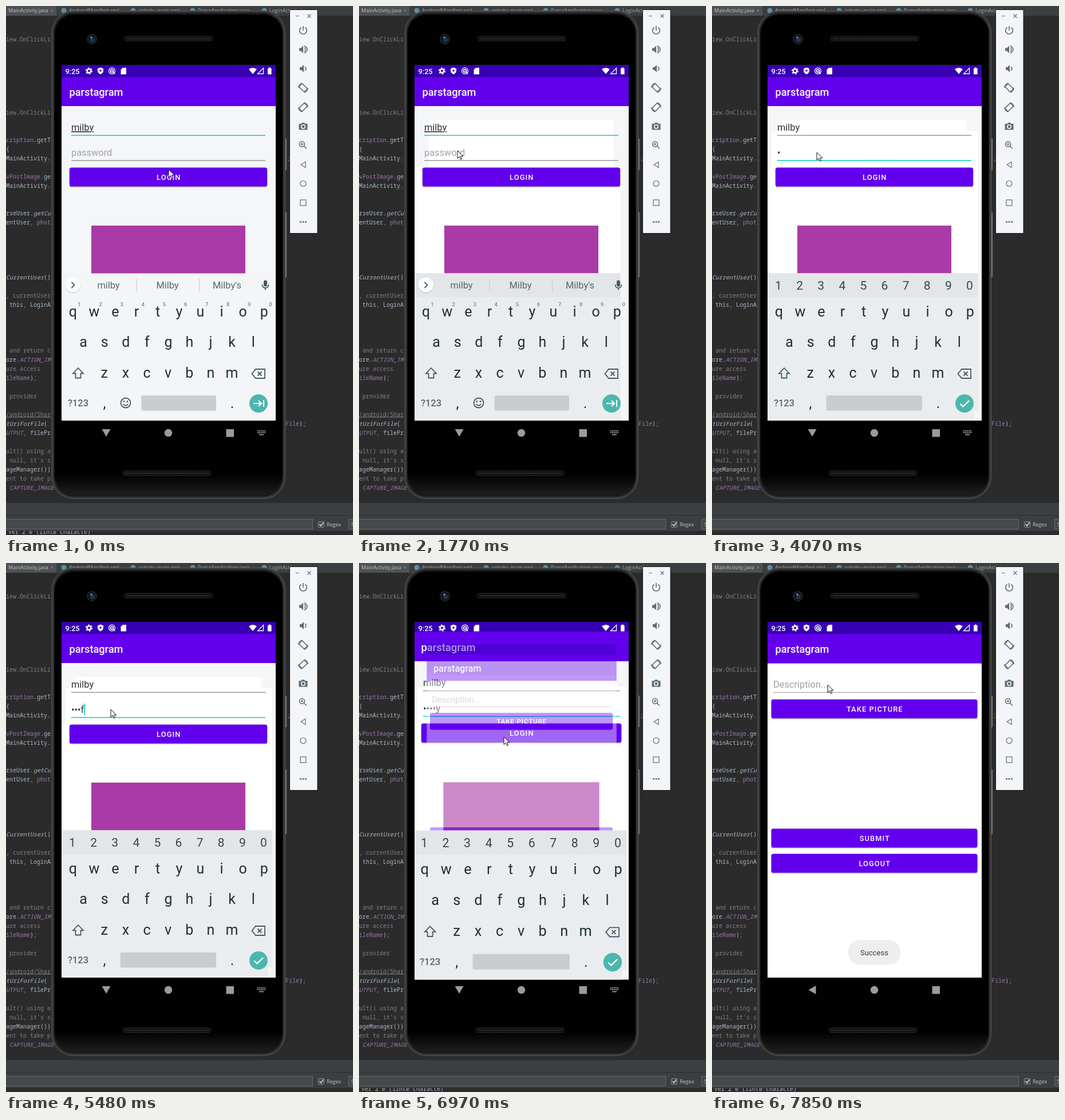
Recreate the animation shown at these times as an HTML page. Size 606 px wide and 925 px high, loop 8 s.

```html
<!DOCTYPE html>
<html lang="en">
<head>
<meta charset="utf-8">
<title>Login demo</title>
<style>
html, body { margin: 0; width: 100%; height: 100%; overflow: hidden; background: #2b2b2b; }
svg { display: block; width: 100vw; height: 100vh; font-family: Roboto, sans-serif; }
.code { font: 10px "Noto Sans Mono", monospace; fill: #a9b7c6; white-space: pre; }
.code .c { fill: #808080; }
.code .p { fill: #9876aa; }
.code .o { fill: #cc7832; }
.code .i { font-style: italic; }
.code .u { text-decoration: underline; }
.ide { font: 9px "Open Sans", sans-serif; fill: #c3c5c7; }
.title { font-size: 18.2px; font-weight: 500; fill: #fff; }
.field { font-size: 16.4px; fill: #303033; }
.hint { font-size: 16.4px; fill: #a0a0a3; }
.button { font-size: 12.75px; font-weight: 500; letter-spacing: 1.14px; fill: #fff; text-anchor: middle; }
.key { font-size: 25px; fill: #1f2f36; text-anchor: middle; }
.digit { font-size: 21px; fill: #37444b; text-anchor: middle; }
.small { font-size: 9.5px; font-weight: 500; fill: #7b868b; text-anchor: middle; }
.word { font-size: 16.4px; fill: #5a656b; text-anchor: middle; }
.line { fill: none; stroke: #455a64; stroke-width: 1.8; }
.tool { fill: none; stroke: #5d6d77; stroke-width: 1.6; }
.tool .full { fill: #5d6d77; stroke: none; }
</style>
</head>
<body>
<svg id="stage" viewBox="0 0 606 925" preserveAspectRatio="none"></svg>
<script>
const stage = document.getElementById('stage');
const rect = (x, y, w, h, fill, rest = '') =>
  `<rect x="${x}" y="${y}" width="${w}" height="${h}" fill="${fill}" ${rest}/>`;
const text = (x, y, cls, s, rest = '') => `<text x="${x}" y="${y}" class="${cls}" ${rest}>${s}</text>`;
const path = (d, rest = '') => `<path d="${d}" ${rest}/>`;
const circle = (x, y, r, rest = '') => `<circle cx="${x}" cy="${y}" r="${r}" ${rest}/>`;
const group = (id, body, rest = '') => `<g id="${id}" ${rest}>${body}</g>`;
const button = (x, y, w, label) =>
  rect(x, y + 1, w, 33.5, '#0004', 'rx="3.6"') + rect(x, y, w, 33, '#6200ee', 'rx="3.6"') +
  text(284.3, y + 21.3, 'button', label);
const row = (chars, x, step, y, cls) =>
  [...chars].map((ch, i) => text(x + step * i, y, cls, ch)).join('');
const header = rect(97, 103, 374, 22, '#3700b3') + rect(97, 124, 374, 51.5, '#6200ee') +
  text(110.5, 157, 'title', 'parstagram');

// Code lines: [y, markup]; "~cp:word~" marks a styled run.
const codeLines = [
  [58, '~c:iew.OnClickLi~'], [186, '~c:iew.OnClickLi~'], [234, '~p:cription~.getT'], [250, '{'],
  [266, 'MainActivity.'], [298, '~p:vPostImage~.ge'], [314, 'MainActivity.'],
  [362, 'rseUser.~i:getCu~'], [378, 'entUser~o:,~ ~p:phot~'], [474, '~i:CurrentUser~()'],
  [506, '~c:, currentUser~'], [522, ' this~o:,~ LoginA'], [602, '~c: and return c~'],
  [618, 'ore.~pi:ACTION_IM~'], [634, '~c:ure access~'], [650, '~p:ileName~)~o:;~'],
  [682, '~c: provider~'], [714, '~cu:/android/Shar~'], [730, '~i:tUriForFile~( '],
  [746, '~pi:UTPUT~~o:,~ filePr'], [778, '~c:ult() using a~'], [794, "~c: null, it's s~"],
  [810, 'ageManager())'], [826, '~c:ent to take p~'], [842, ' ~pi:CAPTURE_IMAGE~']
];
const styled = s => s.replace(/~(\w+):([^~]*)~/g,
  (_, cls, run) => `<tspan class="${[...cls].join(' ')}">${run}</tspan>`);
const code = (x, y, s) => text(x, y + 3.5, 'code', styled(s));

const editor = rect(0, 0, 606, 925, '#2b2b2b') +
  rect(0, 0, 606, 17, '#3c3f41') + rect(0, 0, 88, 17, '#4e5254') +
  text(4, 11, 'ide', 'MainActivity.java') + text(78, 11, 'ide', '×', 'opacity=".6"') +
  [[101, 'AndroidManifest.xml'], [222, 'activity_main.xml'], [326, 'ParseApplication.java'], [451, 'LoginActivity.java']]
    .map(([x, s]) => circle(x, 8, 4.5, 'fill="#5d8fa0"') + text(x + 9, 11, 'ide', s, 'opacity=".8"')).join('') +
  codeLines.map(([y, s]) => code(0, y, s)).join('') +
  code(488, 730, '~p:File~)~o:;~') + code(491, 266, '~o:;~') +
  rect(0, 869, 606, 49, '#3c3f41') + rect(0, 890, 606, 1.5, '#303234') +
  rect(-2, 897.5, 537.5, 17, '#45494a', 'stroke="#656869"') +
  rect(545.5, 901.5, 10, 10, '#43494a', 'stroke="#8a8c8d" rx="1"') +
  path('M547.5 906l2.5 3 4.5-6', 'fill="none" stroke="#ddd" stroke-width="1.4"') +
  text(560, 910, 'ide', 'Regex') + rect(598.5, 897.5, 20, 17, '#45494a', 'stroke="#656869"') +
  text(603, 910, 'ide', 'S') +
  group('log', text(4, 923, 'code', 'ver 2 0 (lint0 characte)'), 'clip-path="url(#logClip)"');

const speaker = (x, y) => rect(x, y, 154, 8, '#0b0b0b', 'rx="4" stroke="#2e2e2e"') +
  path(`M${x + 4} ${y + 4}h146`, 'stroke="#303030" stroke-width="3" stroke-dasharray="2 1"');
const phone = [[231, 57], [360, 115]].map(([y, h]) => rect(485, y, 6, h, '#686868', 'rx="2" stroke="#202020"')).join('') +
  rect(80, 8.5, 407.5, 853, '#303030', 'rx="38" stroke="#5c5c5c"') +
  rect(82.5, 11, 402.5, 848, '#1b1b1b', 'rx="36" stroke="#484848"') +
  rect(85, 15, 398, 838, 'url(#glass)', 'rx="33"') +
  circle(150, 58, 8.5, 'fill="#15181c" stroke="#2b2b2b"') + circle(151, 59, 4, 'fill="#20354f"') +
  circle(149, 55, 1.5, 'fill="#8ba6be"') + speaker(207, 53) + speaker(204, 813);

const rotateIcon = (y, flip) => `<g transform="translate(519 ${y}) scale(${flip} 1)">` +
  rect(-4, -6.5, 8, 13, 'none', 'transform="rotate(-45)"') + path('M-8 0a8 8 0 0 1 6-8M8 0a8 8 0 0 1-6 8') + '</g>';
const toolbar = rect(495.5, 6.5, 48.5, 391, '#f3f5f8', 'stroke="#17191a"') + '<g class="tool">' +
  path('M506 17.5h6M526.5 14.5l6 6m0-6l-6 6', 'stroke-width="1.1"') +
  path('M515.5 37.5a6.3 6.3 0 1 0 7 0M519 35v8') +
  path('M512 73.5h3l4-4v13l-4-4h-3z', 'class="full"') + path('M521 72.5q4 3.5 0 7M521 69.5q10 6.5 0 13') +
  path('M513 107h3l4-4v13l-4-4h-3z', 'class="full"') + path('M522 106q4 3.5 0 7') +
  rotateIcon(143, 1) + rotateIcon(177, -1) +
  path('M511.5 206h4l1.5-2h4l1.5 2h4v10.5h-15z', 'class="full"') +
  circle(519, 211, 3.2, 'stroke="#f3f5f8"') +
  circle(517, 241.5, 4.5) + path('M520.5 245l4.5 4.5M515 241.5h4m-2-2v4') +
  path('M523 272.5v10l-8-5z', 'stroke-width="1.2"') + circle(519, 310.5, 5, 'stroke-width="1.2"') +
  rect(514, 339, 10, 10, 'none', 'stroke-width="1.2"') +
  [514.5, 519, 523.5].map(x => circle(x, 377.5, 1.6, 'class="full"')).join('') + '</g>';

const login = header + rect(97, 175, 374, 550, '#f4f6f8') +
  group('patch', rect(122, 199, 323, 84, '#fff') + rect(97, 282, 360, 186, '#fff')) +
  group('widePatch', rect(104, 219, 361, 249, '#fff')) +
  text(114, 218, 'field', 'milby', 'id="user"') + rect(114, 225.5, 339, 1.5, '#999', 'id="userLine"') +
  text(114, 262, 'hint', 'password', 'id="pass"') + rect(114, 269.5, 339, 1.5, '#999', 'id="passLine"') +
  rect(0, 0, 1.6, 20, '#03cbb8', 'id="caret"') +
  button(110.8, 282.5, 345.4, 'LOGIN') +
  circle(258, 299, 0, 'id="ripple" fill="#fff" clip-path="url(#loginClip)"') +
  rect(149, 384, 269, 269, '#a93aa6');

const suggestions = circle(117, 488.5, 13.5, 'fill="#0003"') + circle(117, 487.7, 13.3, 'fill="#fbfcfd"') +
  path('M114.5 483l5 5-5 5', 'class="line"') +
  [[179, 'milby'], [282, 'Milby'], [386, "Milby's"]].map(([x, s]) => text(x, 494, 'word', s)).join('') +
  rect(227.5, 477, 1, 22, '#c3c8cb') + rect(337, 477, 1, 22, '#c3c8cb') +
  rect(450, 479.5, 6, 11, '#455a64', 'rx="3"') +
  path('M447.5 487c0 8 11 8 11 0M453 493v3.5', 'class="line" stroke-width="1.4"') +
  row('1234567890', 128, 37.1, 525, 'small') +
  circle(209, 694, 8.5, 'class="line"') + path('M204.5 696q4.5 5 9 0', 'class="line"') +
  circle(206, 691.5, 1.4, 'fill="#455a64"') + circle(212, 691.5, 1.4, 'fill="#455a64"');
const keyboard = rect(97, 467.5, 374, 257.5, '#f3f5f7') +
  group('kbShade', rect(97, 467.5, 360, 257.5, '#e9edf0') + rect(97, 467.5, 360, 41.5, '#e2e6e8')) +
  group('kbWide', rect(457, 467.5, 8, 240, '#e9edf0') + rect(457, 467.5, 8, 41.5, '#e2e6e8')) +
  group('words', suggestions) + group('digits', row('1234567890', 116, 37.1, 496, 'digit')) +
  row('qwertyuiop', 116.8, 37.1, 543, 'key') + row('asdfghjkl', 135, 37.1, 596, 'key') +
  row('zxcvbnm', 171.8, 37.1, 650, 'key') +
  path('M126 633l9 9.5h-4.5v8h-9v-8h-4.5z', 'class="line"') +
  path('M429.5 643l6.5-8h16v16h-16zM439.5 639.5l7 7m0-7l-7 7', 'class="line"') +
  text(126, 700, 'word', '?123', 'font-weight="500"') + row(',.', 172, 223, 703, 'key') +
  rect(0, 681, 0, 26.5, '#c9cdd0', 'id="space" rx="3"') +
  circle(441, 695, 16, 'fill="#4db6ac"') +
  path('', 'id="enter" fill="none" stroke="#fff" stroke-width="2.2"');

const home = header + rect(97, 175.5, 374, 549.5, '#fff') +
  text(107, 218, 'hint', 'Description...') + rect(107, 225.8, 353, 1, '#92898f') +
  [[238.5, 'TAKE PICTURE'], [464.5, 'SUBMIT'], [508.5, 'LOGOUT']]
    .map(([y, s]) => button(103.5, y, 360, s)).join('');

const status = text(103.5, 118.5, '', '9:25', 'font-size="12.75" font-weight="500" fill="#fff"') +
  circle(145, 113.5, 3.3, 'fill="none" stroke="#fff" stroke-width="2.4"') +
  circle(145, 113.5, 5.2, 'fill="none" stroke="#fff" stroke-width="1.8" stroke-dasharray="2.7 2.745"') +
  path('M165 107.5l5 2v3.5q0 4-5 6.5-5-2.5-5-6.5v-3.5z', 'fill="#fff"') + circle(165, 113, 1.8, 'fill="#3700b3"') +
  circle(185, 113.5, 5.4, 'fill="none" stroke="#fff" stroke-width="1.3"') +
  circle(185, 113.5, 2.3, 'fill="none" stroke="#fff" stroke-width="1.8"') +
  path('M187 115l3 4', 'stroke="#fff" stroke-width="1.4"') +
  path('M204 108h6v11.5h-9.5v-8z', 'fill="#fff"') +
  path('M424 110.5q7-5 14 0l-7 8.5z', 'fill="#fff"') +
  path('M449.5 108.5v10h-10z', 'fill="none" stroke="#fff" stroke-width="1.3"') +
  path('M457 109h1.8v-1.5h3v1.5h1.8v10.5h-6.6z', 'fill="#fff"');
const navBar = path('M-7.5-6.5h15l-7.5 13z', 'id="back" fill="#9b9b9b"') +
  circle(283.5, 746.5, 6.7, 'fill="#9b9b9b"') + rect(384.5, 740, 13.5, 13.5, '#9b9b9b') +
  group('kbIcon', path('M439 743h14M439 746h14', 'stroke="#9b9b9b" stroke-width="2" stroke-dasharray="2 1"') +
    path('M442 749.5h8', 'stroke="#9b9b9b" stroke-width="1.8"'));

stage.innerHTML = `<defs>
  <linearGradient id="glass" x2="0" y2="1"><stop offset=".96" stop-color="#010101"/>
    <stop offset="1" stop-color="#1c1c1c"/></linearGradient>
  <clipPath id="screen">${rect(97, 103, 374, 666, '#000')}</clipPath>
  <clipPath id="loginClip">${rect(110.8, 282.5, 345.4, 33, '#000', 'rx="3.6"')}</clipPath>
  <clipPath id="pageClip">${rect(97, 103, 374, 622, '#000')}</clipPath>
  <clipPath id="logClip">${rect(0, 918, 606, 7, '#000')}</clipPath></defs>` +
  editor + phone + toolbar +
  `<g clip-path="url(#screen)">` +
  group('login', login, 'clip-path="url(#pageClip)"') + group('home', home) + group('keyboard', keyboard) +
  status + navBar +
  group('toast', rect(237.5, 659, 92, 43.5, '#eeeeef', 'rx="21.7"') +
    text(283.5, 686, '', 'Success', 'font-size="13" fill="#3b3b3d" text-anchor="middle"')) + '</g>' +
  path('M0 0v13.5l3.2-3 2.2 5 2.2-1-2.2-4.7h4.6z', 'id="cursor" fill="#fff" stroke="#111" stroke-width="1"');

const el = Object.fromEntries([...stage.querySelectorAll('[id]')].map(e => [e.id, e]));
const set = (id, attrs) => { for (const k in attrs) el[id].setAttribute(k, attrs[k]); };
const show = (id, on) => set(id, { display: on ? 'inline' : 'none' });
const clamp = v => Math.min(1, Math.max(0, v));
const zoom = (s, dy = 0) => `translate(284 ${444 + dy}) scale(${s}) translate(-284 -444)`;

// Pointer moves: start, end, steps, target
const moves = [[1110, 1770, 6, 172, 253], [2630, 3110, 5, 243, 303], [3680, 4070, 4, 183, 256],
  [6190, 6450, 3, 253, 304], [7700, 7850, 2, 202, 213]];
const typed = [[2630, 'a'], [3940, '•'], [4630, '•s'], [5060, '••d'], [5340, '•••f'], [5630, '••••y']];
const caretOn = [[250, 830], [1330, 1740], [2200, 3100], [3600, 4040], [4630, 6190], [6570, 6970]];
const ticks = [6190, 6320, 6450, 6580, 6700, 6850, 6970, 7120, 7270, 7420];

function pointer(t) {
  let x = 284, y = 286;
  for (const [start, end, steps, tx, ty] of moves) {
    if (t < start) break;
    const step = Math.floor((t - start) / (end - start) * (steps - 1) + 1e-6) + 1;
    const u = clamp(step / steps), e = u * u * (3 - 2 * u);
    x += (tx - x) * e;
    y += (ty - y) * e;
  }
  return `translate(${x} ${y})`;
}

function draw(t) {
  const focusPass = t >= 2080, numeric = t >= 2200;
  const pass = typed.filter(([at]) => t >= at).pop()?.[1] ?? '';
  const snap = ticks.filter(v => v <= t).pop() ?? 0;
  show('login', snap < 7420);
  show('log', t < 385 || t >= 6970);
  show('patch', t >= 385);
  show('widePatch', numeric);
  show('kbShade', t >= 385);
  show('kbWide', numeric);
  show('words', !numeric);
  show('digits', numeric);

  set('user', { 'text-decoration': focusPass ? 'none' : 'underline' });
  set('userLine', { fill: focusPass ? '#99999c' : '#03d3c0' });
  set('passLine', { fill: focusPass ? '#03d3c0' : '#99999c' });
  el.pass.textContent = pass || 'password';
  set('pass', { class: pass ? 'field' : 'hint' });
  const width = focusPass ? (pass && el.pass.getComputedTextLength()) || 0 : el.user.getComputedTextLength();
  set('caret', { x: 114 + width, y: focusPass ? 246 : 202 });
  show('caret', caretOn.some(([a, b]) => t >= a && t < b));

  set('space', numeric ? { x: 199.5, width: 167.5 } : { x: 236.5, width: 130.5 });
  set('enter', { d: numeric ? 'M433.5 695.5l5 5 10.5-10.5' : 'M432 695h14m-5-5l5 5-5 5M450 689v12' });

  set('ripple', {
    r: snap < 6450 ? 0 : 40 + 77 * (snap - 6450) / 130,
    opacity: .24 * clamp((6970 - snap) / 270)
  });

  // The new screen grows in while the old one swells and the keyboard drops away.
  const p = 1 - (1 - clamp((snap - 6940) / 450)) ** 4;
  const drop = clamp((snap - 7040) / 170);
  set('login', { transform: zoom(1 + .05 * p) });
  set('home', { transform: zoom(.85 + .15 * p), opacity: clamp((snap - 6930) / 100) });
  set('keyboard', { transform: zoom(1 + .05 * p, 100 * drop * drop), opacity: 1 - drop });
  set('back', { transform: `translate(175 746.5) rotate(${90 * clamp((snap - 7010) / 155)})` });
  show('kbIcon', snap < 7120);
  set('toast', { opacity: clamp((snap - 7060) / 150) });
  set('cursor', { transform: pointer(t) });
}

const begin = performance.now();
function frame() {
  draw((performance.now() - begin) % 8000);
  requestAnimationFrame(frame);
}
frame();
</script>
</body>
</html>
```
